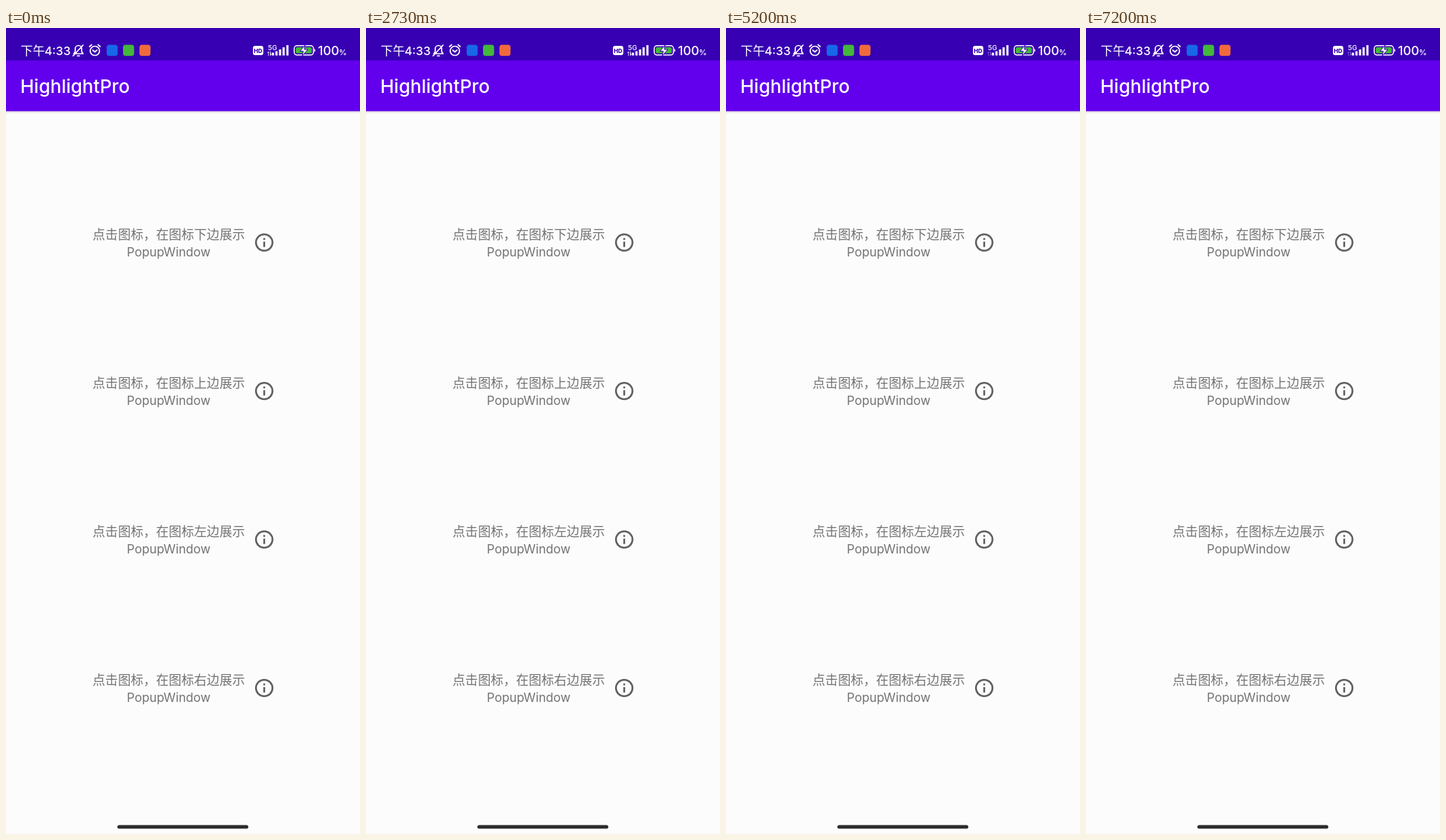
An HTML page for the animation above (7990 ms loop, 496x1129 px).

```html
<!DOCTYPE html>
<html lang="zh-CN">
<head>
<meta charset="utf-8">
<style>
html, body { margin: 0; width: 100%; height: 100%; overflow: hidden; background: #fcfcfc; }
svg { display: block; width: 100%; height: 100%; }
text { font-family: Inter, "Noto Sans CJK SC", sans-serif; }
.label { font-size: 17.2px; fill: #737373; text-anchor: middle; }
.han { font-size: 17.8px; font-weight: 350; }
.tip { font-size: 17.7px; font-weight: 500; fill: #fff; text-anchor: middle; }
</style>
</head>
<body>
<svg id="stage" viewBox="0 0 496 1129">
  <defs>
    <linearGradient id="shade" x2="0" y2="1">
      <stop stop-color="#d2d2d2"/><stop offset="1" stop-color="#fcfcfc"/>
    </linearGradient>
    <radialGradient id="press">
      <stop stop-color="#bdbdbd"/><stop offset="1" stop-color="#cecece"/>
    </radialGradient>
    <g id="info" fill="#5f5f5f">
      <circle r="11.6" fill="none" stroke="#5f5f5f" stroke-width="2.5"/>
      <path d="M-1.3-1.3h2.6v7.6h-2.6zM-1.3-6.3h2.6v2.6h-2.6z"/>
    </g>
  </defs>
  <rect width="496" height="1129" fill="#fcfcfc"/>
  <rect y="116" width="496" height="4" fill="url(#shade)"/>
  <rect width="496" height="46" fill="#3700b3"/>
  <rect y="45.5" width="496" height="71" fill="#6200ee"/>
  <text x="20" y="91" font-size="26" font-weight="500" fill="#fff">HighlightPro</text>

  <g fill="#fff" font-weight="500">
    <text x="20.5" y="37.5" font-size="17">下午</text>
    <text x="54" y="37.5" font-size="16.5">4:33</text>
    <g fill="none" stroke="#fff" stroke-width="1.7" stroke-linecap="round" stroke-linejoin="round">
      <path d="M95 36h13l-2-3v-4a4.5 4.5 0 0 0-9 0v4zM100 39h3M108 24L94 39"/>
      <circle cx="124.500" cy="32" r="6.500"/>
      <path d="M117 26l3-2.500M132 26l-3-2.500M121.500 31l3 2.500 3-2.500"/>
    </g>
    <rect x="141" y="23.500" width="15.500" height="15.500" rx="3.500" fill="#1767e8"/>
    <rect x="164" y="23.500" width="15.500" height="15.500" rx="3.500" fill="#43b83b"/>
    <rect x="187" y="23.500" width="15.500" height="15.500" rx="3.500" fill="#f06a3c"/>
    <rect x="346" y="25" width="14.500" height="13" rx="3"/>
    <text x="353.200" y="34.500" font-size="8" font-weight="800" fill="#3700b3" text-anchor="middle">HD</text>
    <text x="367" y="31" font-size="9.500">5G</text>
    <path id="data" d="M367.500 39v-4h-1.500l2.300-2.500v6.500zM370 33v6l2.500-2.500h-1.500v-3.500z"/>
    <path d="M374 38.500v-4M379 38.500v-6M384 38.500v-8.500M389 38.500v-11.500M394.300 38.500v-14.500" stroke="#fff" stroke-width="3"/>
    <rect x="403.800" y="24.800" width="27" height="13" rx="4" fill="none" stroke="#fff" stroke-width="1.500"/>
    <rect x="406" y="27" width="22.500" height="8.600" rx="2" fill="#43b83b"/>
    <path d="M432 29q3 2.300 0 4.600z"/>
    <path d="M419 24l-7 8.500h4.500l-1.500 6.500 8-9h-5z" stroke="#3700b3"/>
    <text x="437" y="37.500" font-size="17.500">100</text>
    <text x="466.500" y="37.500" font-size="11" font-weight="600">%</text>
  </g>
  <rect x="156" y="1116.500" width="183.500" height="5" rx="2.500" fill="#2b2b2b"/>
</svg>
<script>
const stage = document.getElementById('stage'), data = document.getElementById('data');
const LOOP = 7990, FADE = 40, CX = 361.8;

// press: touch begins; open and close: lifetime of the popup
// box: x, y, width, height; arrow: its three corners; both relative to the icon
const rows = [
  { side: '下', press: 340, open: 530, close: 1600, box: [-54.5, 30.5, 109, 44], arrow: '-10,31 0,20.5 10,31' },
  { side: '上', press: 2870, open: 3070, close: 3730, box: [-54.5, -74.5, 109, 44], arrow: '-10,-31 0,-20 10,-31' },
  { side: '左', press: 4200, open: 4470, close: 5200, box: [-141.5, -62, 111, 124], arrow: '-31,-10 -20.5,0 -31,10' },
  { side: '右', press: 6030, open: 6200, close: 7130, box: [30.5, -62, 98.5, 124], arrow: '31,-10 20.5,0 31,10' }
];

rows.forEach((row, i) => {
  const [x, y, w, h] = row.box;
  const group = document.createElementNS('http://www.w3.org/2000/svg', 'g');
  group.setAttribute('transform', `translate(${CX} ${300.5 + 208 * i})`);
  group.innerHTML = `
    <circle r="28.5" fill="url(#press)"/>
    <text class="label han" x="-133.8" y="-5">点击图标，在图标${row.side}边展示</text>
    <text class="label" x="-133.8" y="19">PopupWindow</text>
    <use href="#info"/>
    <g class="popup" fill="#7e7e7e">
      <rect x="${x}" y="${y}" width="${w}" height="${h}" rx="5"/>
      <polygon points="${row.arrow}"/>
      <text class="tip" x="${x + w / 2}" y="${y + h / 2 + 7}">I'm here!!</text>
    </g>`;
  stage.append(group);
  row.ripple = group.querySelector('circle');
  row.popup = group.querySelector('.popup');
});

function draw(now) {
  const t = now % LOOP;
  for (const { press, open, close, ripple, popup } of rows) {
    const shown = t < open ? Math.min(1, Math.max(0, (t - press) / FADE)) : 0;
    ripple.setAttribute('opacity', shown);
    popup.setAttribute('visibility', t >= open && t < close ? 'visible' : 'hidden');
  }
  data.setAttribute('opacity', t < 4070 ? 1 : 0.4);
  requestAnimationFrame(draw);
}
draw(0);
</script>
</body>
</html>
```
